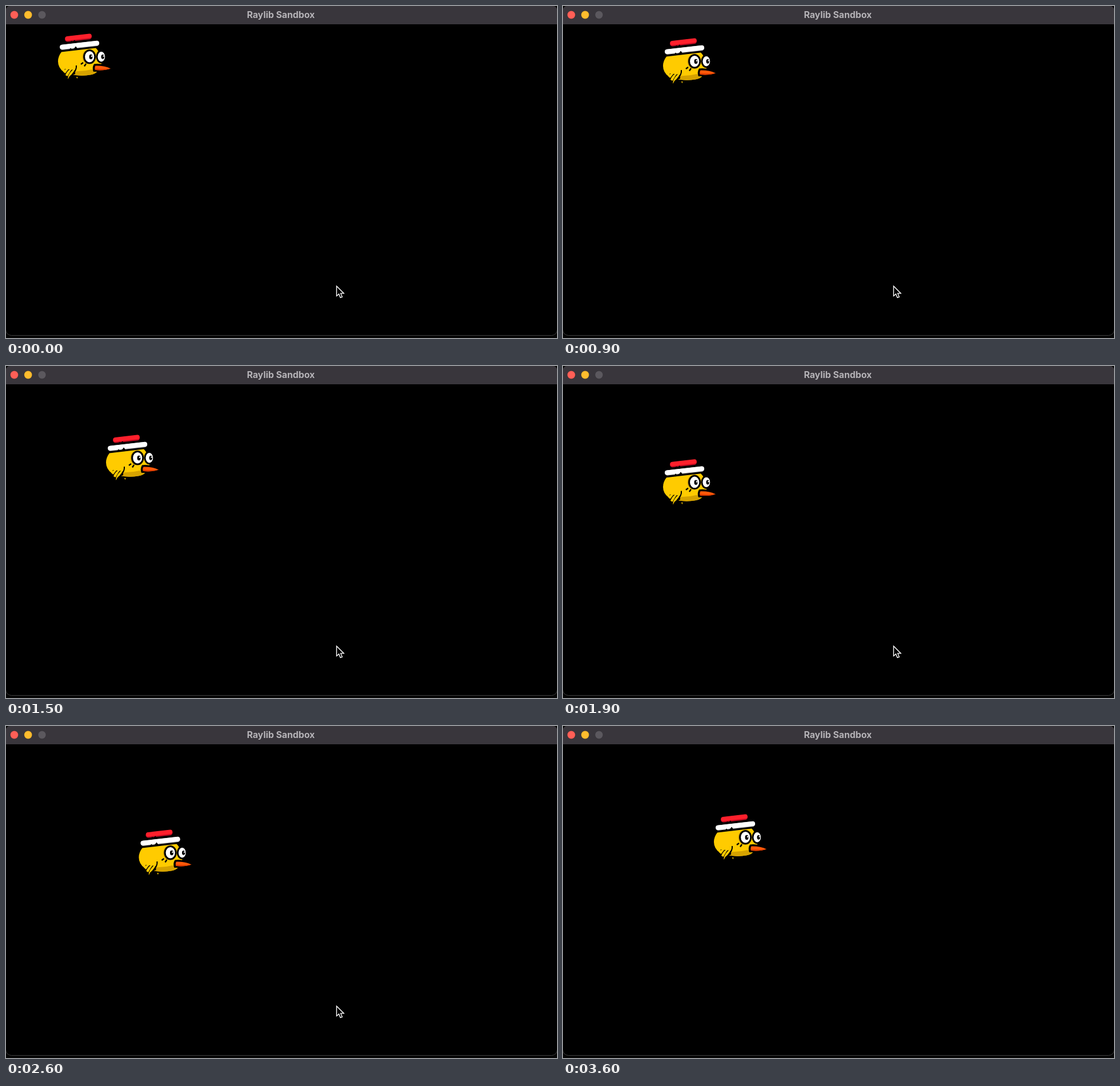
An HTML page that plays this animation: 964 by 581 pixels, repeating every 4110 ms.

```html
<!DOCTYPE html>
<html lang="en">
<head>
<meta charset="utf-8">
<title>Raylib Sandbox</title>
<style>
  html, body { margin: 0; width: 100%; height: 100%; overflow: hidden; background: #000; }
  svg { display: block; }
  text { font: 700 15.8px Inter, Roboto, sans-serif; }
</style>
</head>
<body>
<svg width="964" height="581" viewBox="0 0 964 581">
  <!-- window -->
  <rect width="964" height="581" fill="#050505"/>
  <rect x="-.5" y="-.5" width="965" height="577" rx="10" fill="#000" stroke="#404040"/>
  <path d="M0 32V8Q0 0 8 0H956Q964 0 964 8V32Z" fill="#39363c"/>
  <g stroke="#000" stroke-opacity=".15">
    <circle cx="14.500" cy="15.500" r="6.900" fill="#ff5f57"/>
    <circle cx="38.700" cy="15.500" r="6.900" fill="#febc2e"/>
    <circle cx="63" cy="15.500" r="6.900" fill="#5b585e"/>
  </g>
  <text x="480.800" y="20.700" text-anchor="middle" fill="#b5b3b7">Raylib Sandbox</text>

  <g id="bird">
    <!-- head -->
    <path d="M97 80.500L157 73.500Q160 76 162 80L168 99L166 103Q161 118 150 120Q130 124 112 119L101 115.500Q91 108 91 97Q91 88 97 80.500Z" fill="#ffcb00"/>
    <path d="M118 114Q134 115 150 111L158 115Q155 119 148 120.500Q128 124 112 119Z" fill="#d6a300"/>
    <ellipse cx="142" cy="89" rx="8.500" ry="11.500" fill="#d6a300"/>
    <!-- wing feathers -->
    <path d="M101 117L104 123L109 129L116 121L121 119V112L103 110Z"/>
    <g fill="#ffcb00">
      <path d="M100 115Q105 108 116 104Q108 111 103.500 118Z"/>
      <path d="M104 121Q107 112 119 106Q112 114 107.500 123Z"/>
      <path d="M108.500 128Q107 119 122 107Q119 117 111 123Z"/>
      <path d="M123 124H125.500L124.500 127.500Z"/>
    </g>
    <path d="M123 104Q124 112 116 120" fill="none" stroke="#000" stroke-width="2"/>
    <path d="M131 102L135 99M137 105.500L140 101" stroke="#000" stroke-width="2.400"/>
    <!-- eyes -->
    <g fill="#fff" stroke="#000" stroke-width="3">
      <ellipse cx="166.800" cy="88.700" rx="7.900" ry="10.200"/>
      <ellipse cx="146.200" cy="88.700" rx="9.600" ry="11.300"/>
    </g>
    <ellipse cx="148.500" cy="89" rx="3" ry="4.200"/>
    <ellipse cx="169.200" cy="88.800" rx="2.700" ry="3.900"/>
    <g fill="#fff">
      <circle cx="150" cy="87.800" r="1.300"/>
      <circle cx="170.600" cy="87.600" r="1.200"/>
    </g>
    <!-- beak -->
    <path d="M153 115Q150 108 154 101.500Q162 100 172 103L184 109.500L172 115Z"/>
    <path d="M156.500 104.500Q172 104 183 109.500Q172 113.500 156 112Q154.500 108 156.500 104.500Z" fill="#ff5a0a"/>
    <path d="M155.500 109.500Q170 111 183 109.500Q172 113.500 156 112Z" fill="#e03c00"/>
    <!-- hat -->
    <g fill="none" stroke-linecap="round">
      <path d="M107.500 58L145.500 53.800" stroke="#c40a20" stroke-width="9"/>
      <path d="M107.300 56.800L146 52.300" stroke="#ff202c" stroke-width="7.600"/>
      <path d="M98.600 72.300L158.700 65.500" stroke="#c9c9ce" stroke-width="9"/>
      <path d="M98.200 71.800L159 64.800" stroke="#fff" stroke-width="8"/>
    </g>
    <path d="M112 64L114 61L117 62L120 59.500L123 63ZM111 76L113 73.500L115 75.500L119 74.500L122 70.500L125.500 75Z"/>
  </g>

  <path id="cursor" d="M578.400 490.200V507.500L582.400 504L585 510.300L588.200 509L585.600 502.900H591Z" fill="#000" stroke="#fff" stroke-width="1.400"/>
</svg>
<script>
const LOOP = 4110, STEP = 100, CURSOR_OFF = 3500;
const SPEED = 0.1067; // px per ms
const bird = document.getElementById("bird");
const cursor = document.getElementById("cursor");

// Distance covered by a key press that starts at a time and ends after max px.
const run = (t, start, max) => Math.min(max, Math.max(0, t - start) * SPEED);

function draw(now) {
  const t = Math.min(3600, Math.floor(now % LOOP / STEP) * STEP);
  const x = run(t, 0, 84) + run(t, 2062, 89);
  const y = run(t, 825, 133) - run(t, 2897, 27);
  bird.setAttribute("transform", `translate(${x} ${y})`);
  cursor.style.visibility = t < CURSOR_OFF ? "visible" : "hidden";
}

const begin = performance.now();
function tick() {
  draw(performance.now() - begin);
  requestAnimationFrame(tick);
}
tick();
</script>
</body>
</html>
```
